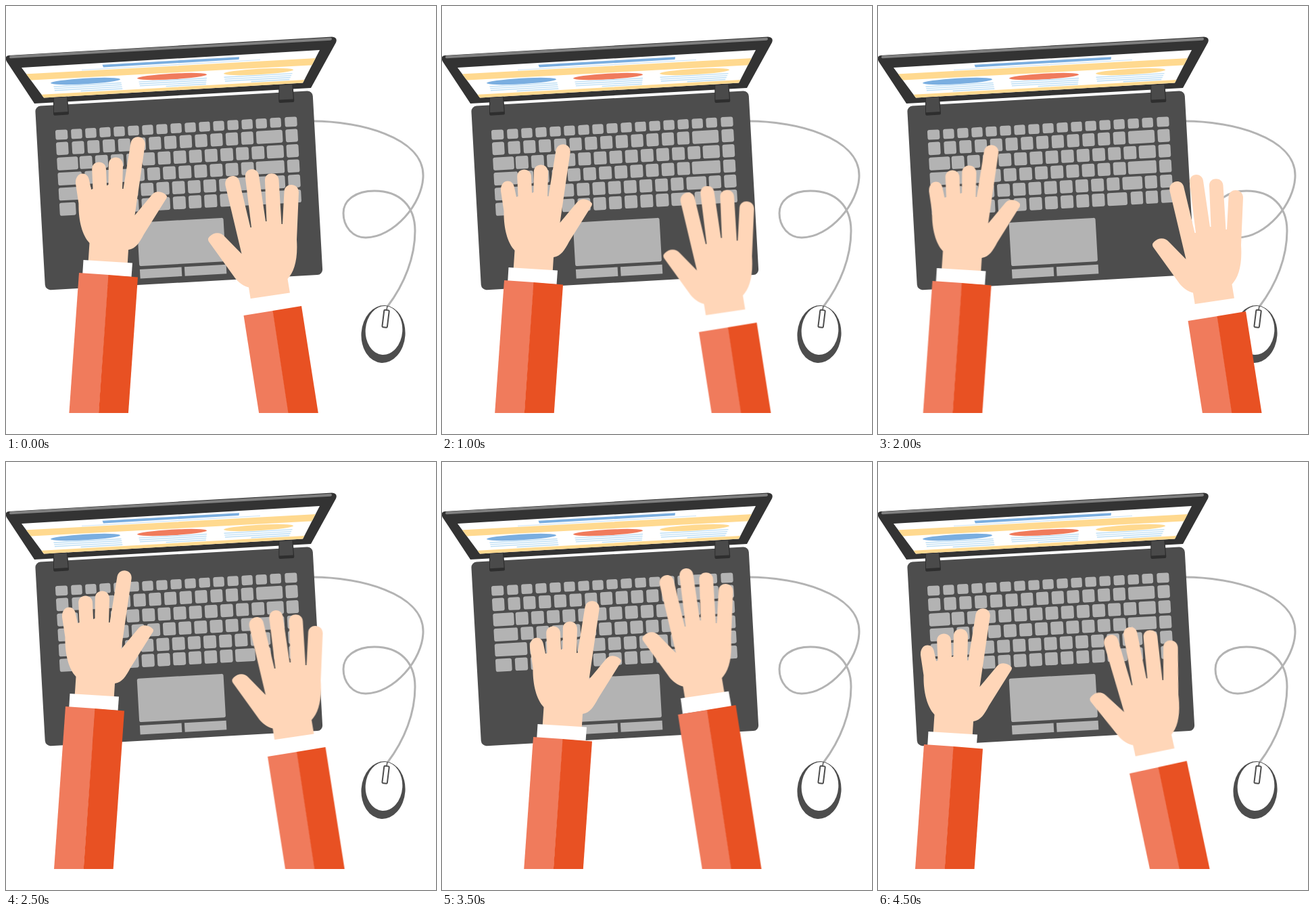
Recreate the animation shown at these times as an HTML page. Size 636 px wide and 632 px high, loop 5000 ms.

```html
<!DOCTYPE html>
<html lang="en">
<head>
<meta charset="utf-8">
<title>Typing on a laptop</title>
<style>
  html, body { margin: 0; width: 100%; height: 100%; overflow: hidden; background: #fff; }
  svg { display: block; width: 100vw; height: 100vh; }
  .hand { animation: 5s step-end infinite; }
  #left { animation-name: left; }
  #right { animation-name: right; transform-origin: 351.5px 457px; }
  .skin { fill: #ffd6b8; }
  .cuff { fill: #fff; }
  .sleeve { fill: #f07b5c; }
  .shade { fill: #e85123; }

  @keyframes left {
    0%   { transform: translate(0, 0); }
    10%  { transform: translate(-16px, 0); }
    20%  { transform: translate(-16px, 11px); }
    30%  { transform: translate(33.5px, 11px); }
    40%  { transform: translate(-27.5px, 12px); }
    50%  { transform: translate(-20px, -33px); }
    60%  { transform: translate(-19px, 0); }
    70%  { transform: translate(27px, 12px); }
    80%  { transform: translate(-81px, -10px); }
    90%, 100% { transform: translate(-40px, 23px); }
  }
  @keyframes right {
    0%   { transform: translate(0, 0); }
    10%  { transform: translate(-12px, -16px); }
    20%  { transform: translate(28.5px, 24.5px); }
    30%  { transform: translate(-2px, -39.5px); }
    40%  { transform: translate(107px, 8px); }
    50%  { transform: translate(35.5px, -22px); }
    60%  { transform: translate(-2px, -20px); }
    70%  { transform: translate(-2.5px, -84px); }
    80%  { transform: translate(-51.5px, -65px) rotate(-9.8deg); }
    90%, 100% { transform: translate(20.5px, 3px) rotate(-3.1deg); }
  }
</style>
</head>
<body>
<svg viewBox="0 0 636 632">
  <defs>
    <clipPath id="stage"><rect width="636" height="601"/></clipPath>
    <clipPath id="screen"><path d="M23 91 464 65 439 113.500 56 135.500Z"/></clipPath>
  </defs>

  <!-- cable and mouse -->
  <path d="M454 170C520 170 617 193 617 250C617 292 573 342 532 342C512 342 499 325 499 306C499 286 518 273 545 273C582 273 605 295 605 332C605 370 590 410 564 444"
        fill="none" stroke="#b3b3b3" stroke-width="3"/>
  <ellipse cx="558" cy="484.500" rx="32.500" ry="42.500" fill="#4d4d4d" transform="rotate(4 558 484.500)"/>
  <ellipse cx="559" cy="479" rx="27.300" ry="36" fill="#fff" transform="rotate(4 559 479)"/>
  <path d="M564 443 563 449" stroke="#4d4d4d" stroke-width="1.500"/>
  <rect x="557.800" y="449" width="7.500" height="25.500" rx="1.500" fill="#fff" stroke="#4d4d4d" stroke-width="2"
        transform="rotate(7 561.500 462)"/>

  <!-- lid -->
  <path d="M4 73 482 45.500Q491 46 488 54L451 121 42 144 1 82Q-3 74 4 73Z" fill="#333"/>
  <path d="M7 75.300 480 48.700" stroke="#808080" stroke-width="4" stroke-linecap="round"/>
  <g clip-path="url(#screen)">
    <path d="M0 60H500V140H0Z" fill="#fff"/>
    <path d="M20 101 470 76.500V86.500L20 110.500ZM40 131.500 450 108.500V116L40 140Z" fill="#ffd98f"/>
    <path d="M142.500 86.700 345 75.200 344.500 79 144 90.500Z" fill="#7aaee0"/>
    <path d="M112 94.500 376 79.500" stroke="#cfe4f5" stroke-width="1.200"/>
    <g id="columns"></g>
  </g>

  <!-- base -->
  <g id="base" transform="translate(43 148) rotate(-3.200)">
    <rect width="411" height="272" rx="8" fill="#4d4d4d"/>
  </g>
  <g id="hinge">
    <path d="M70 135 91 133.800 93 158.500Q93 160.500 91 160.600L72 161.700Q70.200 161.500 70 159Z" fill="#2e2e2e"/>
    <path d="M71 135.500 90 134.500 91.500 156 71 157.200Z" fill="#4a4a4a"/>
  </g>
  <use href="#hinge" transform="translate(333.300 -18.600)"/>

  <g clip-path="url(#stage)">
    <g id="left" class="hand">
      <path class="skin" d="M121.500 380 123.500 350C112 338 107 315 107.500 292L103 262C102 244 121 243 123 257L126 271 128.500 270 127.200 241C127 227 148 227 148 241L149 265 151.500 264 151.800 234C152 220 173 220 173 235L172 270 173.500 270 184.500 202C188 188 208 192 205.500 206L190.500 309 216 278.500C221 272 232 273 237.500 280Q239 282 236 286L204 337C197 350 192 358 181 360L179.500 384Z"/>
      <path class="cuff" d="M114.500 375 187 379.500 185.500 400 113.200 395.500Z"/>
      <path class="sleeve" d="M108 394 152 397 130 700H86.400Z"/>
      <path class="shade" d="M151.500 397 195 400.500 174 700H130Z"/>
    </g>
    <g id="right" class="hand">
      <path class="skin" d="M362 434 359 415.500C350 413 344 408 339 402L300 348Q297.500 344 301 340.500C308 333 318 334 323 340L348.500 366 325 267C320 251 341 245 345 258L361.500 327 363 327 354 254C352 238 372 237 374 250L384 318 385.500 318 383 258C382 244 403 244 403.500 257L407.500 322 409 322 411.500 274C412 260 433 261 433 275L430 345C432 375 426 393 416.500 403L420 424Z"/>
      <path class="cuff" d="M355.500 433 426.500 422.500 430.500 445 358.500 456Z"/>
      <path class="sleeve" d="M351.500 457 395 450 436 720H392.800Z"/>
      <path class="shade" d="M394.500 450 437 443 480.500 720H435.500Z"/>
    </g>
  </g>
</svg>
<script>
  const add = (parent, tag, attrs) => {
    const node = document.createElementNS("http://www.w3.org/2000/svg", tag);
    for (const name in attrs) node.setAttribute(name, attrs[name]);
    document.getElementById(parent).append(node);
  };

  const block = (x, y, width, height, rx = 3) =>
    add("base", "rect", { x, y, width, height, rx, fill: "#b3b3b3" });

  // Each row: a first key, a run of equal keys, some extra keys [centre, width], a last key.
  const keyRow = (y, h, first, start, pitch, count, width, extras = []) => {
    const key = (centre, w) => block(centre - w / 2, y - h / 2, w, h);
    key(27.8 + first / 2, first);
    for (let i = 0; i < count; i++) key(start + i * pitch, width);
    extras.forEach(([centre, w]) => key(centre, w));
    key(376.6, 18);
  };

  keyRow(44.1, 14.5, 18, 59.1, 21.05, 15, 16.3);
  keyRow(64.5, 19, 18, 60.2, 22.78, 12, 18, [[343.6, 39]]);
  keyRow(87, 19, 31, 70.6, 23.17, 12, 18.8, [[351, 25]]);
  keyRow(109.4, 19, 35.5, 77, 23.17, 11, 18.8, [[342.3, 42]]);
  keyRow(131.8, 19, 48, 89.2, 23.2, 10, 18.8, [[326.5, 29.5], [354, 18]]);
  keyRow(154.2, 19, 24, 66, 23.2, 10, 18.8, [[302.8, 29.5], [331.8, 18], [354, 18]]);
  block(140.8, 180, 128, 64.5);
  block(141.2, 249.2, 61.8, 13.5, 0);
  block(207.3, 249.2, 61.8, 13.5, 0);

  // Screen columns: an oval heading above four lines of text.
  [[117.5, 111, "#7aaee0"], [245.5, 104, "#f07b5c"], [373.5, 97, "#ffd98f"]].forEach(([x, y, fill], column) => {
    add("columns", "ellipse", { cx: x, cy: y, rx: 51.5, ry: 4.3, fill, transform: `rotate(-3.2 ${x} ${y})` });
    for (let i = 0; i < 4; i++) {
      const from = x - 47 - column * 2 + i * 0.7 + (i === 3 ? 38 : 0);
      const to = x + 53 - column * 1.5 - i * (column - 0.6);
      const lineY = px => y + 5.4 + i * 2.9 - (px - x) * 0.056;
      add("columns", "path", {
        d: `M${from} ${lineY(from)}L${to} ${lineY(to)}`, stroke: "#bfdff5", "stroke-width": 1.4
      });
    }
  });
</script>
</body>
</html>
```
